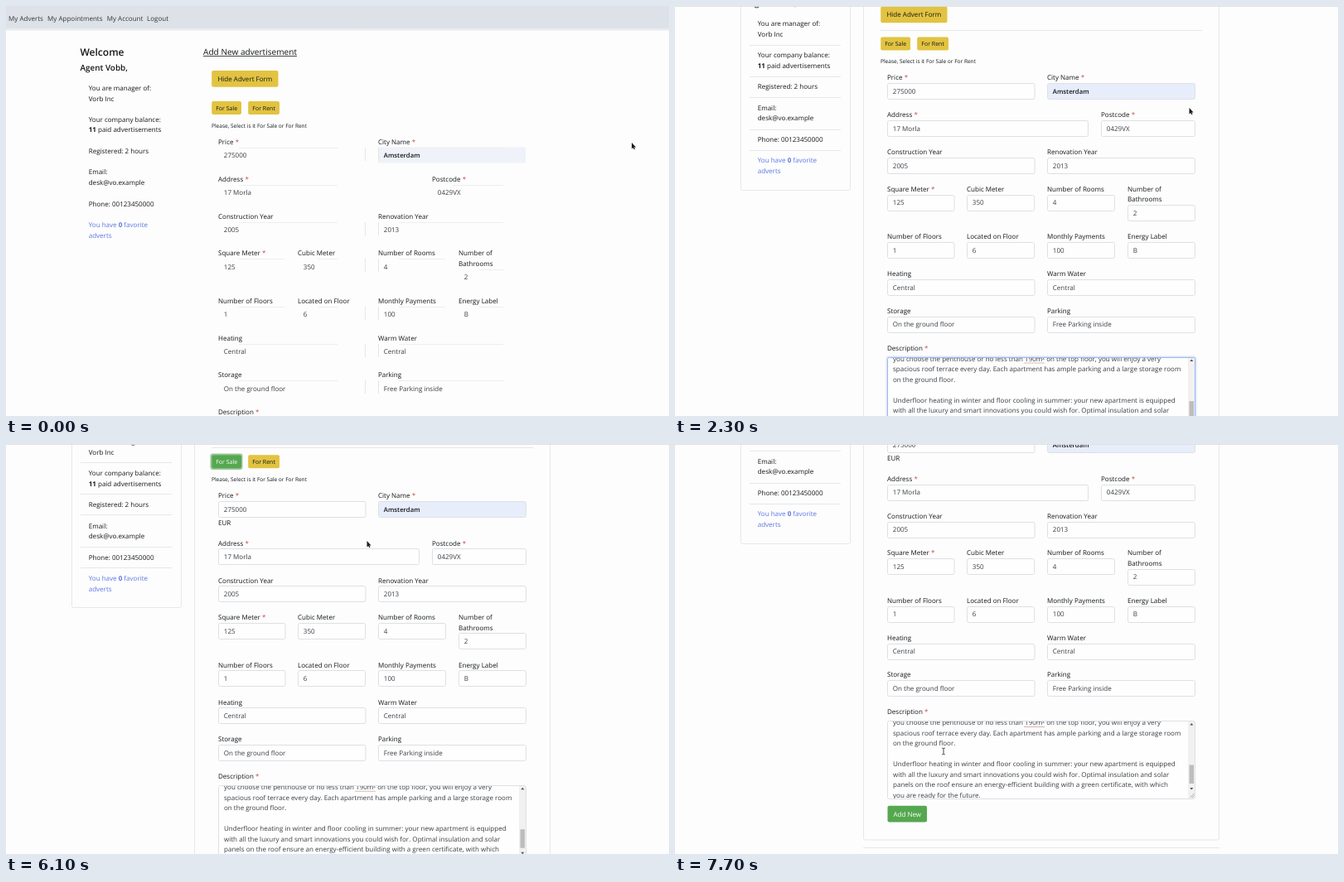
An HTML page with a canvas for the animation above (8000 ms loop, 800x495 px).

```html
<!DOCTYPE html>
<html lang="en">
<head>
<meta charset="utf-8">
<title>Add New advertisement</title>
<style>
  html, body { margin: 0; height: 100%; overflow: hidden; background: #fdfdfd; }
  canvas { display: block; }
</style>
</head>
<body>
<canvas id="stage" width="800" height="495"></canvas>
<script>
const ctx = document.getElementById('stage').getContext('2d');
const LOOP = 8000, STEP = 100, EUR_HEIGHT = 12.5;
const INK = '#15181a', VALUE = '#393e43', RED = '#c9504c';
const LINE = '#e5e7e9', EDGE = '#dde0e4', YELLOW = '#e2c341', GREEN = '#55a84f';

// Keys are [time, ...values]
const SCROLL = [[1700, 0], [1800, 24], [2000, 59.3], [2100, 69], [2300, 77.5],
  [5900, 77.5], [6300, 126], [6600, 179.5]];
const POINTER = [[700, 755, 165], [1100, 620.5, 123], [2600, 620.5, 123], [3000, 280.5, 33],
  [3500, 280.5, 33], [4000, 264, 45], [5200, 264, 45], [5600, 435.5, 117],
  [7100, 435.5, 117], [7700, 324, 371]];

// Label, value, x, width, label y, required
const FIELDS = [
  ['Price', '275000', 256, 177.5, 164, true],
  ['City Name', 'Amsterdam', 449, 178, 164, true],
  ['Address', '17 Morla', 256, 242, 209, true],
  ['Postcode', '0429VX', 514, 113, 209, true],
  ['Construction Year', '2005', 256, 177.5, 254],
  ['Renovation Year', '2013', 449, 178, 254],
  ['Square Meter', '125', 256, 80.5, 298.5, true],
  ['Cubic Meter', '350', 352, 81, 298.5],
  ['Number of Rooms', '4', 449, 81, 298.5],
  ['Number of|Bathrooms', '2', 546, 81, 298.5],
  ['Number of Floors', '1', 256, 80.5, 356],
  ['Located on Floor', '6', 352, 81, 356],
  ['Monthly Payments', '100', 449, 81, 356],
  ['Energy Label', 'B', 546, 81, 356],
  ['Heating', 'Central', 256, 177.5, 401],
  ['Warm Water', 'Central', 449, 178, 401],
  ['Storage', 'On the ground floor', 256, 177.5, 445.5],
  ['Parking', 'Free Parking inside', 449, 178, 445.5]
];

const DESCRIPTION = [
  'you choose the penthouse or no less than 190m² on the top floor, you will enjoy a very',
  'spacious roof terrace every day. Each apartment has ample parking and a large storage room',
  'on the ground floor.',
  '',
  'Underfloor heating in winter and floor cooling in summer: your new apartment is equipped',
  'with all the luxury and smart innovations you could wish for. Optimal insulation and solar',
  'panels on the roof ensure an energy-efficient building with a green certificate, with which',
  'you are ready for the future.'
];

let scroll = 0, reveal = 1;

function track(keys, t, ease = u => u) {
  const next = keys.findIndex(k => k[0] > t);
  if (next === 0) return keys[0].slice(1);
  if (next < 0) return keys[keys.length - 1].slice(1);
  const a = keys[next - 1], b = keys[next], u = ease((t - a[0]) / (b[0] - a[0]));
  return a.slice(1).map((v, i) => v + (b[i + 1] - v) * u);
}
const smooth = u => u * u * (3 - 2 * u);
const snap = y => Math.round(y - scroll) + scroll;

// Draws text centred on y and returns its right end
function text(str, x, y, { size = 8.04, weight = 400, color = INK, align = 'left' } = {}) {
  ctx.font = `${weight} ${size}px "Open Sans", sans-serif`;
  ctx.textAlign = align;
  ctx.fillStyle = color;
  ctx.fillText(str, x, y + size * 0.36);
  return x + ctx.measureText(str).width;
}

function rule(x1, x2, y, color = LINE) {
  ctx.fillStyle = color;
  ctx.fillRect(x1, snap(y), x2 - x1, 1);
}

function box(x, y, w, h, { fill, stroke, radius = 2, line = 1 }) {
  ctx.beginPath();
  ctx.roundRect(x + 0.5, snap(y) + 0.5, w, h, radius);
  if (fill) { ctx.fillStyle = fill; ctx.fill(); }
  if (stroke) { ctx.strokeStyle = stroke; ctx.lineWidth = line; ctx.stroke(); }
}

function faded(draw) {
  ctx.globalAlpha = reveal;
  draw();
  ctx.globalAlpha = 1;
}

function button(label, x, y, w, h, fill, size, color = INK) {
  ctx.beginPath();
  ctx.roundRect(x, y, w, h, 2);
  ctx.fillStyle = fill;
  ctx.fill();
  text(label, x + w / 2, y + h / 2, { size, color, align: 'center' });
}

function input(x, y, w, fill) {
  faded(() => box(x, y, w, 19, { fill, stroke: EDGE }));
  if (reveal === 1) return;
  // Only pieces of the outline are there at the start
  rule(x + 25, Math.min(x + w, x < 440 ? 400 : 600), y, '#eceeef');
  ctx.fillStyle = '#e3e6e8';
  if (x + w > 432 && x + w < 436) ctx.fillRect(433, snap(y), 1, 16);
  if (x === 449) ctx.fillRect(449, snap(y), 1, 16);
}

function field([label, value, x, w, y, required]) {
  const lines = label.split('|'), city = label === 'City Name';
  let end = x;
  lines.forEach((part, i) => { end = text(part, x, y + i * 12.5); });
  if (required) text('*', end + 2.2, y, { color: RED });
  const top = y + 6.5 + (lines.length - 1) * 12.5;
  if (city && reveal < 1) { ctx.fillStyle = '#eff2f8'; ctx.fillRect(449, top, 178, 19); }
  input(x, top, w, city ? '#e8edfb' : '#fefefe');
  text(value, x + 6.8, top + 10, city ? { weight: 600, size: 7.75 } : { color: VALUE });
}

function triangle(x, y, dir) {
  ctx.fillStyle = '#505050';
  ctx.beginPath();
  ctx.moveTo(x - 2, y - dir);
  ctx.lineTo(x + 2, y - dir);
  ctx.lineTo(x, y + dir * 1.4);
  ctx.fill();
}

function textarea(y, focused) {
  if (focused) box(255, y - 1, 373, 96, { stroke: 'rgba(125,160,240,.25)', line: 2, radius: 3 });
  box(256, y, 371, 94, { fill: '#fefefe' });
  ctx.save();
  ctx.beginPath();
  ctx.rect(256, y + 1, 371, 93);
  ctx.clip();
  DESCRIPTION.forEach((line, i) => text(line, 263, y + 2.5 + i * 12.5, { color: VALUE }));
  ctx.strokeStyle = '#c9a09c';
  ctx.lineWidth = 0.8;
  ctx.beginPath();
  for (let x = 421; x <= 446; x++) ctx.lineTo(x, y + 7 + x % 2);
  ctx.stroke();
  ctx.fillStyle = '#f1f1f1';
  ctx.fillRect(619, y + 1, 8, 93);
  ctx.fillStyle = '#bdbdbd';
  ctx.fillRect(620.5, y + 53.5, 5.5, 22.5);
  triangle(623.3, y + 4.5, -1);
  triangle(623.3, y + 82, 1);
  ctx.strokeStyle = '#8c8c8c';
  ctx.lineWidth = 0.7;
  ctx.beginPath();
  for (const d of [2.5, 5]) { ctx.moveTo(626.5 - d, y + 93); ctx.lineTo(626.5, y + 93 - d); }
  ctx.stroke();
  ctx.restore();
  box(256, y, 371, 94, { stroke: focused ? '#a0b5ee' : EDGE });
}

function sidebar() {
  faded(() => {
    box(79, 38, 132, 261, { stroke: LINE });
    [124, 162, 187, 226, 251].forEach(y => rule(90, 200, y));
  });
  text('Welcome', 89.5, 56, { size: 12, weight: 600 });
  text('Agent Vobb,', 89.5, 74, { size: 9.9, weight: 600 });
  text('You are manager of:', 99.7, 99);
  text('Vorb Inc', 99.7, 111.7);
  text('Your company balance:', 99.7, 137);
  text(' paid advertisements', text('11', 99.7, 149.5, { weight: 700 }), 149.5);
  text('Registered: 2 hours', 99.7, 175);
  text('Email:', 99.7, 200.5);
  text('desk@vo.example', 99.7, 213);
  text('Phone: 00123450000', 99.7, 238.7);
  const color = '#5b78e2';
  let x = text('You have ', 99.7, 264, { color });
  x = text('0', x, 264, { color, weight: 700 });
  text(' favorite', x, 264, { color });
  text('adverts', 99.7, 276.7, { color });
}

function form(t) {
  const priced = t >= 4900, pressed = t >= 4800, chosen = t >= 5300, hover = t >= 3900;
  const shift = priced ? EUR_HEIGHT : 0;
  faded(() => {
    box(227, 38, 429, 606 + shift, { stroke: LINE });
    rule(227, 657, 653.5 + shift);
    rule(248, 636, 106);
  });
  const end = text('Add New advertisement', 238, 55.3, { size: 10.1, weight: 500 });
  rule(238, end, 60, reveal < 1 ? '#44474a' : '#3f7a48');
  button('Hide Advert Form', 248.2, 78, 80.3, 19.8, YELLOW);
  const saleColor = chosen ? GREEN : pressed ? '#b8992b' : hover ? '#cfb138' : YELLOW;
  if (pressed) {
    box(247, 114, 37, 17.5, { stroke: chosen ? 'rgba(60,140,60,.5)' : 'rgba(170,140,40,.55)', line: 2 });
  }
  button('For Sale', 248.2, 115, 35.8, 16, saleColor, 7, chosen ? '#fff' : INK);
  button('For Rent', 292.2, 115, 37.8, 16, YELLOW, 7);
  text('Please, Select is it For Sale or For Rent', 248, 144.5, { size: 6.55 });

  FIELDS.slice(0, 2).forEach(field);
  if (priced) text('EUR', 256, 196.5);
  ctx.save();
  ctx.translate(0, shift);
  scroll -= shift;
  FIELDS.slice(2).forEach(field);
  const labelEnd = text('Description', 256, 490.5);
  text('*', labelEnd + 2.2, 490.5, { color: RED });
  textarea(501, !pressed);
  button('Add New', 256.5, 603.8, 47.5, 19.8, GREEN, 8.04, '#fff');
  scroll += shift;
  ctx.restore();
}

function navbar() {
  const bar = ctx.createLinearGradient(0, 0, 0, 30);
  bar.addColorStop(0, '#dee2e8');
  bar.addColorStop(reveal < 1 ? 0.86 : 0.97, '#dde1e8');
  bar.addColorStop(1, '#f3f4f6');
  ctx.fillStyle = bar;
  ctx.fillRect(0, 0, 800, 30);
  [['My Adverts', 3], ['My Appointments', 50], ['My Account', 121.7], ['Logout', 170]]
    .forEach(([label, x]) => text(label, x, 15.3, { color: '#34383b' }));
}

const ARROW = new Path2D('M0 0V7.4L1.7 5.9L2.8 8.3L4 7.8L2.9 5.4H5.1Z');
const HAND = new Path2D('M0 0.6Q.8 -.4 1.6 .6V3L5 3.8Q5.8 4.2 5.5 5.4L4.8 8.6H1L-1.6 5Q-1.4 4 0 5Z');
const BEAM = new Path2D('M-1.8 -3.8H-.5L0 -3.2L.5 -3.8H1.8M0 -3.2V3.2M-1.8 3.8H-.5L0 3.2L.5 3.8H1.8');

function pointer(t) {
  const [x, y] = track(POINTER, t, smooth);
  ctx.save();
  ctx.translate(x, y);
  if (t >= 7300) {
    ctx.strokeStyle = '#333';
    ctx.lineWidth = 0.9;
    ctx.stroke(BEAM);
  } else {
    const shape = t >= 3900 && t < 5300 ? HAND : ARROW;
    ctx.strokeStyle = 'rgba(255,255,255,.6)';
    ctx.stroke(shape);
    ctx.fillStyle = '#1c1c1c';
    ctx.fill(shape);
  }
  ctx.restore();
}

function draw(now) {
  const t = Math.floor(now % LOOP / STEP) * STEP;
  scroll = track(SCROLL, t)[0];
  reveal = Math.min(1, Math.max(0, (t - 700) / 400));
  ctx.textRendering = 'geometricPrecision';
  ctx.fillStyle = '#fdfdfd';
  ctx.fillRect(0, 0, 800, 495);
  ctx.save();
  ctx.translate(0, -scroll);
  navbar();
  sidebar();
  form(t);
  ctx.restore();
  if (scroll > 30) { ctx.fillStyle = '#dfe1e4'; ctx.fillRect(0, 0, 800, 1); }
  pointer(t);
}

const start = performance.now();
function loop() {
  draw(performance.now() - start);
  requestAnimationFrame(loop);
}
loop();
</script>
</body>
</html>
```
